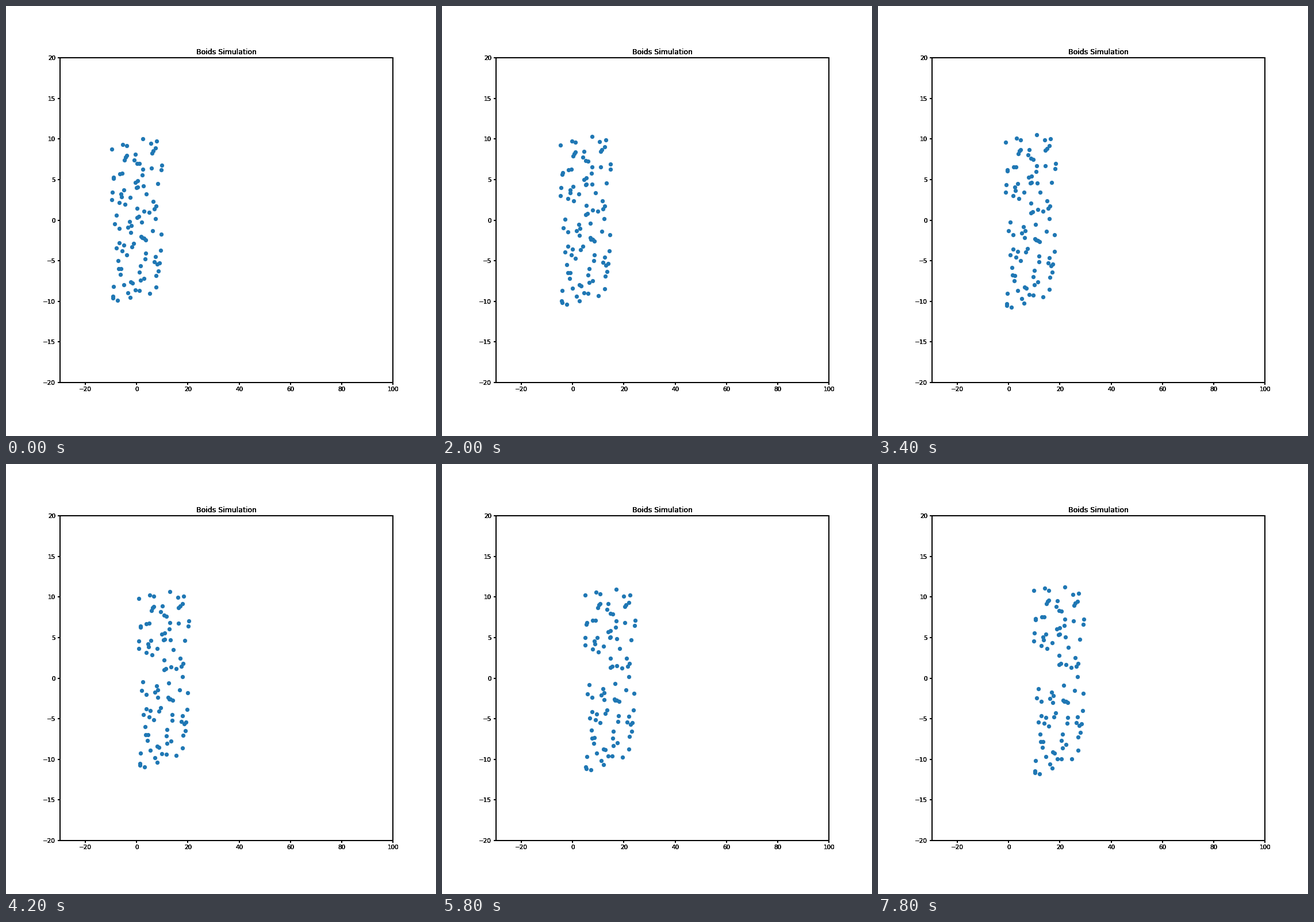
A matplotlib script for the animation above (8000 ms loop, 748 by 748 pixels).

```python
import numpy as np
import matplotlib.pyplot as plt
from matplotlib.animation import FuncAnimation

STEPS = 40
BOIDS = 100
SPEED = 0.5  # units to the right per step

plt.rcParams.update({"axes.linewidth": 1.5, "xtick.major.width": 1.5,
                     "ytick.major.width": 1.5})

rng = np.random.default_rng(7)
x0 = rng.uniform(-9.8, 9.9, BOIDS)
y0 = np.linspace(9.9, -9.9, BOIDS) + rng.uniform(-0.1, 0.1, BOIDS)


def total_drift(x, y):
    """Vertical distance covered over the whole run as the flock splits."""
    up = np.where(y > np.where(x < -5, 1.5, 0), 1, -1)
    rear = up * (1.35 - 0.075 * x)
    front = 0.07 * y + up * 0.12 * np.clip(7 - x, 0, None)
    return np.where(x < 1.8, rear, front)


drift = total_drift(x0, y0)


def positions(step):
    return np.column_stack([x0 + SPEED * step,
                            y0 + drift * step / (STEPS - 1)])


fig = plt.figure(figsize=(10, 10), dpi=74.8)

# Stacked identical axes give the dense lettering and frame
for layer in range(4):
    ax = fig.add_axes([0.125, 0.1245, 0.775, 0.755], label=str(layer))
    ax.set(xlim=(-30, 100), ylim=(-20, 20), title="Boids Simulation")
    ax.patch.set_visible(False)

boids = ax.scatter(x0, y0, color="tab:blue")


def draw(step):
    boids.set_offsets(positions(step))
    return (boids,)


anim = FuncAnimation(fig, draw, frames=STEPS, interval=200, repeat=True,
                     repeat_delay=0)
plt.show()
```
